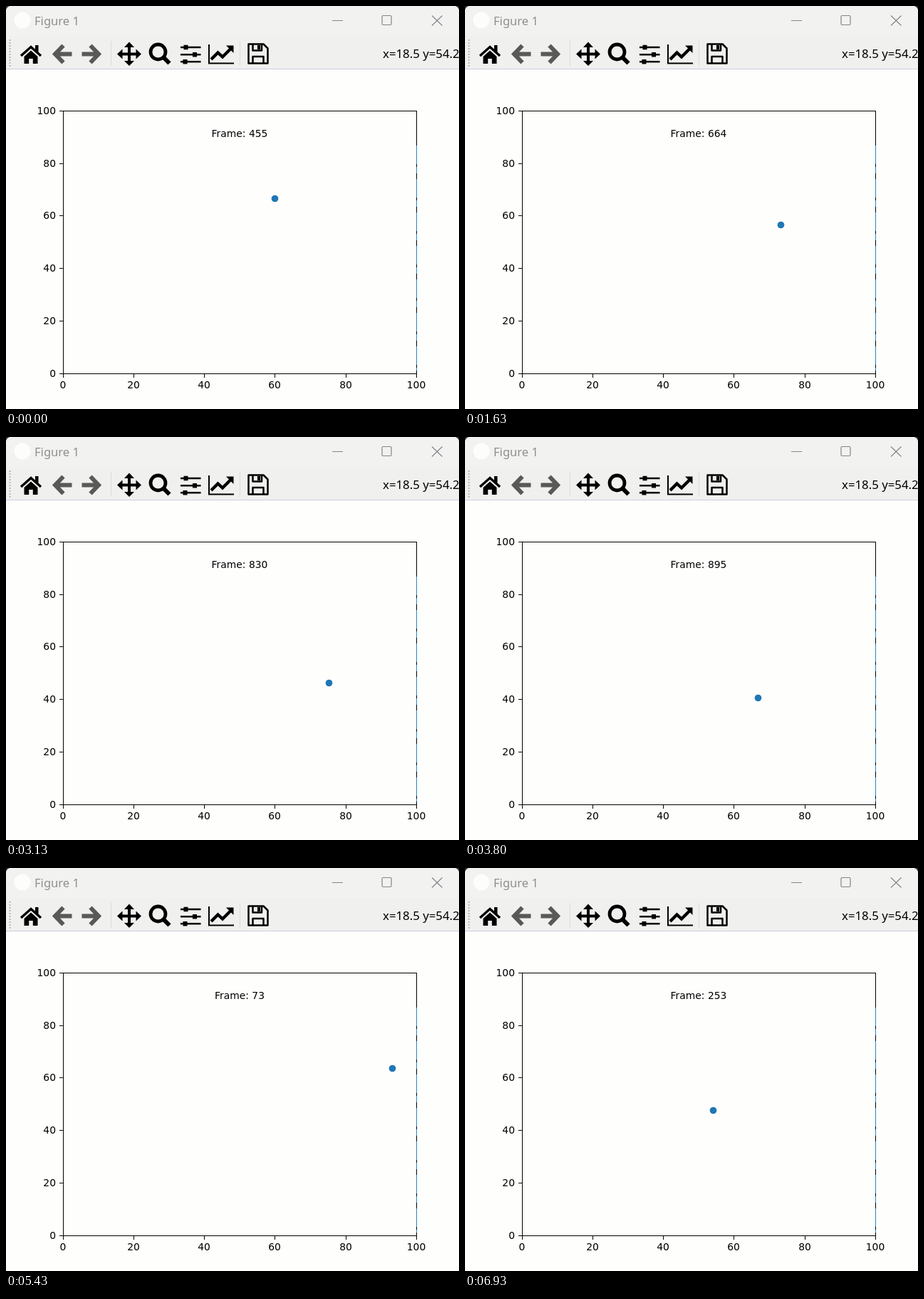
An HTML page that plays this animation: 636 px wide and 566 px high, repeating every 6.96 s.

```html
<!DOCTYPE html>
<html lang="en">
<head>
<meta charset="utf-8">
<title>Figure 1</title>
<style>
  html, body { margin: 0; width: 100%; height: 100%; overflow: hidden; background: #2e2e2c; }
  svg { display: block; width: 636px; height: 566px; }
  .ui { font-family: "Noto Sans", "Open Sans", sans-serif; }
  .plot text { font: 13.89px "DejaVu Sans", sans-serif; }
  .line { fill: none; stroke: #000; }
</style>
</head>
<body>
<svg viewBox="0 0 636 566">
  <defs>
    <clipPath id="window"><rect width="636" height="574" rx="7"/></clipPath>
    <clipPath id="area"><rect x="80" y="147" width="497" height="370"/></clipPath>
  </defs>
  <g clip-path="url(#window)">
    <rect width="636" height="566" fill="#fefefd"/>
    <rect width="636" height="43" fill="#f2f2f0"/>
    <rect y="43" width="636" height="45" fill="#f0f0ef"/>
    <rect y="88" width="636" height="1" fill="#ccccdd"/>

    <!-- title bar -->
    <circle cx="23" cy="20" r="11.5" fill="#fdfdfb"/>
    <text class="ui" x="40" y="27" font-size="16.6" fill="#8f8f8f">Figure 1</text>
    <g fill="none" stroke="#85858c" stroke-width="1.2">
      <path d="M458 20.5H473M598 13.5L612.5 27.5M612.5 13.5L598 27.5"/>
      <rect x="528" y="13.5" width="13" height="13" rx="1.5"/>
    </g>

    <!-- toolbar -->
    <path d="M5.5 47V86" stroke="#b4b4b4" stroke-width="2" stroke-dasharray="2 2"/>
    <path d="M147.5 49V84M328.5 49V84" stroke="#dcdcdc"/>
    <path class="line" d="M21 70L35 57.5L49 70" stroke-width="3.4"/>
    <path d="M41 55H45.5V65L41 61ZM35 62.5L44.5 71V81H37.8V74H32.2V81H25.5V71Z"/>
    <g fill="none" stroke="#595957" stroke-width="6">
      <path d="M80.5 55.5L69 67.5L80.5 79.5M69 67.5H92.5"/>
      <path d="M118.5 55.5L130 67.5L118.5 79.5M130 67.5H106.5"/>
    </g>
    <path class="line" d="M160 67.5H186M173 55V80" stroke-width="4"/>
    <path d="M173 50.5L180 58H166ZM173 84L180 77H166ZM156 67.5L163.5 60.5V74.5ZM190 67.5L182.5 60.5V74.5Z"/>
    <circle class="line" cx="213.5" cy="64.5" r="10.5" stroke-width="4.8"/>
    <path class="line" d="M221 72L229.5 80.5" stroke-width="6"/>
    <path class="line" d="M245 58H273.5M245 68.2H273.5M245 78.2H273.5" stroke-width="2.4"/>
    <path class="line" d="M249.5 58H255.5M262 68.2H268M248.5 78.2H254.5" stroke-width="6.6"/>
    <path class="line" d="M285 54V80.5H320" stroke-width="2"/>
    <path class="line" d="M288 75L297.5 65.5L304 71.5L315 60.5" stroke-width="4.4"/>
    <path d="M309 55.5H319.5V66Z"/>
    <g class="line" stroke-width="2.5" stroke-linejoin="round">
      <path d="M340.5 53.5H361.5L367.5 59.5V80.5H340.5Z"/>
      <path d="M346.5 54V62.5H359V54M346.5 80V71H361.5V80"/>
    </g>
    <path d="M353 55H357V61H353Z"/>
    <text class="ui" x="529" y="73" font-size="16.8">x=18.5 y=54.2</text>

    <!-- plot -->
    <g class="plot">
      <rect class="line" x="80.5" y="147.5" width="496" height="369"/>
      <path d="M576.5 196V512" stroke="#2a86c4" stroke-dasharray="26 4 9 8"/>
      <g id="ticks"></g>
      <text id="label" x="328" y="184" text-anchor="middle">Frame: 455</text>
      <g clip-path="url(#area)"><circle id="ball" r="4.85" fill="#1f77b4"/></g>
    </g>
  </g>
</svg>
<script>
const $ = id => document.getElementById(id);
const LOOP = 6960, FIRST = 455, WRAP = 1000;
const START_X = -60, SPEED = 0.8938;

// the counter runs unevenly: time in ms, steps done
const pace = [[0, 455], [1070, 599], [2170, 726], [3130, 830], [4470, 960], [5430, 1074], [6930, 1254]];

// ball height at each side wall in turn
const wallHeights = [57.8, 80, 63, 39.4, 48.6, 24.7, 66.5, 57, 39.7];

const lerp = (a, b, k) => a + (b - a) * k;
const snap = v => Math.round(v - 0.5) + 0.5;
const toX = v => snap(80.3 + 4.96 * v);
const toY = v => snap(516.4 - 3.692 * v);

function stepsAt(t) {
  const i = pace.findIndex(p => t <= p[0]) || 1;
  const [t0, n0] = pace[i - 1], [t1, n1] = pace[i];
  return Math.round(lerp(n0, n1, (t - t0) / (t1 - t0)));
}

// constant sideways speed, mirrored at both walls
function ballAt(n) {
  const run = (START_X + SPEED * (n - FIRST)) / 100 + 1;
  const lap = Math.floor(run), k = run - lap;
  return {
    x: 100 * (lap % 2 ? k : 1 - k),
    y: lerp(wallHeights[lap], wallHeights[lap + 1], k)
  };
}

function drawTicks() {
  let out = "";
  for (let v = 0; v <= 100; v += 20) {
    const x = toX(v), y = toY(v);
    out += `<path class="line" d="M${x} 517v5M80 ${y}h-5"/>
      <text x="${x - 0.5}" y="537" text-anchor="middle">${v}</text>
      <text x="70" y="${y + 4.5}" text-anchor="end">${v}</text>`;
  }
  $("ticks").innerHTML = out;
}

// the picture changes at 0, 30 and 70 ms of every 100
function stepTime(t) {
  const r = t % 100;
  return t - r + (r < 30 ? 0 : r < 70 ? 30 : 70);
}

function draw(now) {
  const n = stepsAt(stepTime(now % LOOP));
  const ball = ballAt(n);
  const count = n < WRAP ? n : Math.max(0, n - WRAP - 1);
  $("label").textContent = "Frame: " + count;
  $("ball").setAttribute("cx", toX(ball.x));
  $("ball").setAttribute("cy", toY(ball.y));
}

drawTicks();
const start = performance.now();
function tick() {
  draw(performance.now() - start);
  requestAnimationFrame(tick);
}
tick();
</script>
</body>
</html>
```
